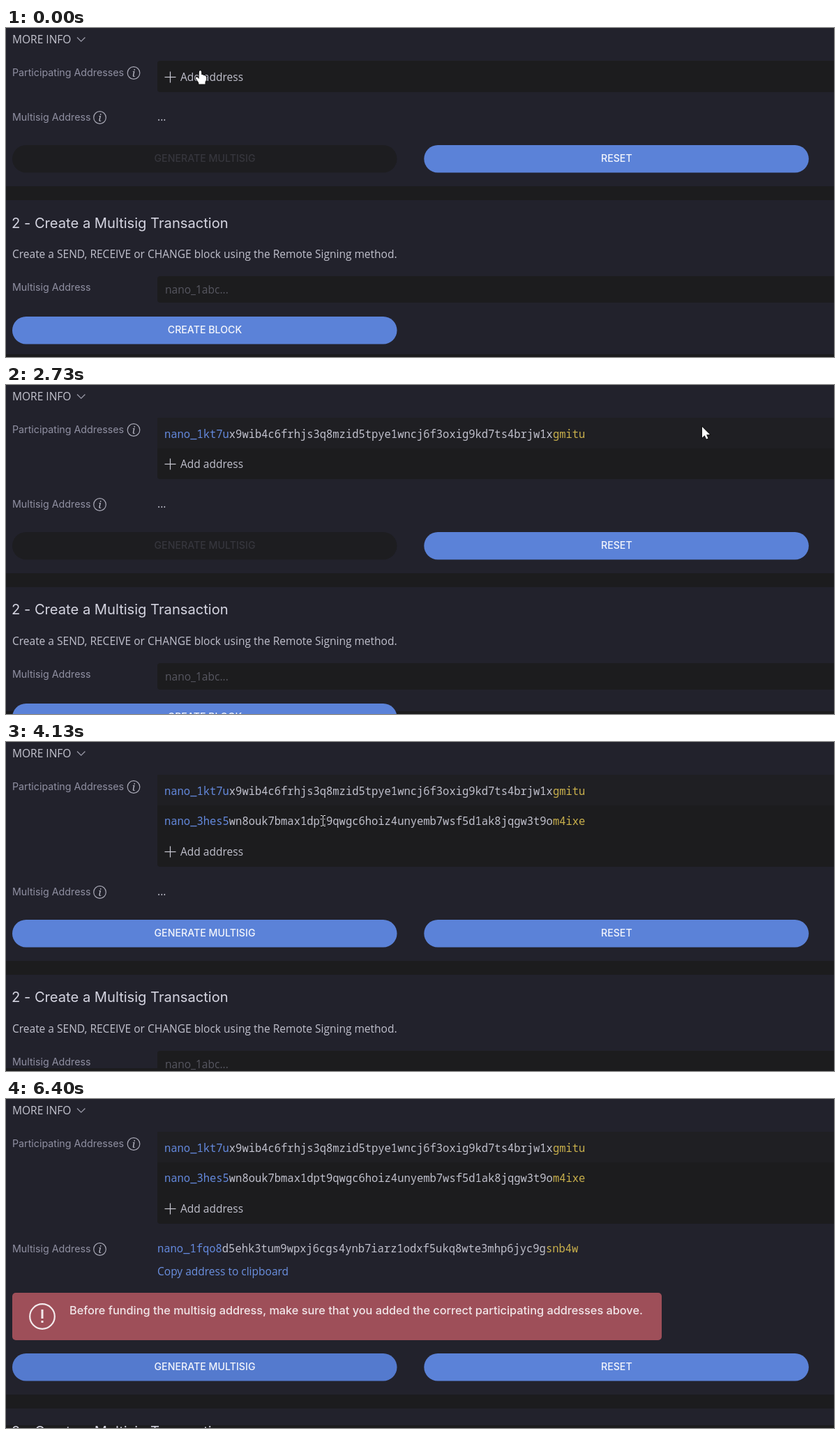
These frames come from a looping animation (1187x472 px, 6990 ms). An HTML page with a canvas:

```html
<!DOCTYPE html>
<html lang="en">
<head>
<meta charset="utf-8">
<title>Multisig form</title>
<style>
html, body { margin: 0; width: 100%; height: 100%; overflow: hidden; background: #22222c; }
canvas { display: block; }
</style>
</head>
<body>
<canvas id="stage" width="1187" height="472"></canvas>
<script>
const ctx = document.getElementById('stage').getContext('2d');
const W = 1187, H = 472, LOOP = 6990, FPS = 15, TICKS = 105;

const SANS = '15.52px "Open Sans", "Noto Sans", sans-serif';
const MONO = '500 15.48px "Noto Sans Mono", "DejaVu Sans Mono", monospace';
const LABEL = '14.25px Inter, sans-serif';
const BUTTON = '500 14.2px Inter, sans-serif';
const TITLE = '20.15px Inter, sans-serif';
const WARN = '500 16.29px Inter, sans-serif';

const BG = '#22222c', DARK = '#1c1c1e', ROW = '#1f1f23';
const TEXT = '#c1c1cd', MUTED = '#9090a2', BLUE = '#6489dd', GOLD = '#c9b04c';
const FILL = [91, 130, 216], HOVER = [77, 113, 196], OFF = [29, 29, 32];
const ROW_STEP = 43.4;

const FIRST = 'nano_1kt7ux9wib4c6frhjs3q8mzid5tpye1wncj6f3oxig9kd7ts4brjw1xgmitu';
const SECOND = 'nano_3hes5wn8ouk7bmax1dpt9qwgc6hoiz4unyemb7wsf5d1ak8jqgw3t9om4ixe';
const SHARED = 'nano_1fqo8d5ehk3tum9wpxj6cgs4ynb7iarz1odxf5ukq8wte3mhp6jyc9gsnb4w';

// Ticks (1/15 s) at which the page changes
const OPEN1 = 4, FOCUS1 = 7, PASTE1 = 11, SAVE1 = 13;
const OPEN2 = 51, FOCUS2 = 53, PASTE2 = 59, SAVE2 = 60, DONE = 75;

const clamp = v => Math.max(0, Math.min(1, v));
const mix = (a, b, p) => a + (b - a) * p;
const blend = (a, b, p) => `rgb(${a.map((v, i) => Math.round(mix(v, b[i], p)))})`;
const smooth = p => p * p * (3 - 2 * p);

function text(str, x, y, font, color, align = 'left') {
  ctx.font = font;
  ctx.fillStyle = color;
  ctx.textAlign = align;
  ctx.fillText(str, x, y);
}

function rect(x, y, w, h, color) {
  ctx.fillStyle = color;
  ctx.fillRect(x, y, w, h);
}

function round(x, y, w, h, r, color) {
  ctx.beginPath();
  ctx.roundRect(x, y, w, h, r);
  ctx.fillStyle = color;
  ctx.fill();
}

function line(points, color, width) {
  ctx.beginPath();
  points.forEach(([x, y]) => ctx.lineTo(x, y));
  ctx.strokeStyle = color;
  ctx.lineWidth = width;
  ctx.stroke();
}

function ring(x, y, r, color, width) {
  ctx.beginPath();
  ctx.arc(x, y, r, 0, Math.PI * 2);
  ctx.strokeStyle = color;
  ctx.lineWidth = width;
  ctx.stroke();
}

function info(x, y) {
  ring(x, y, 8.8, '#a9a9b6', 1.2);
  text('i', x, y + 5, 'italic 15px "Noto Serif", serif', '#b9b9c5', 'center');
}

function button(label, x, y, color, ink = '#f4f6fc') {
  round(x, y, 551.5, 39.5, 19.75, color);
  text(label, x + 276, y + 24, BUTTON, ink, 'center');
}

function address(str, x, y) {
  const parts = [[str.slice(0, 10), BLUE], [str.slice(10, -5), TEXT], [str.slice(-5), GOLD]];
  for (const [part, color] of parts) {
    text(part, x, y, MONO, color);
    x += ctx.measureText(part).width;
  }
}

function addLink(y) {
  line([[227.5, y + .5], [243.5, y + .5]], '#c8c8d2', 1.2);
  line([[235.5, y - 7.5], [235.5, y + 8.5]], '#c8c8d2', 1.2);
  text('Add address', 250, y + 6, SANS, TEXT);
}

function input(y, value, focus) {
  const top = Math.round(y), height = Math.round(y + 38.3) - top;
  ctx.beginPath();
  ctx.roundRect(227.5, top + .5, 1000, height - 1, 4);
  ctx.fillStyle = '#1b1b1d';
  ctx.fill();
  if (!focus) return;
  ctx.strokeStyle = `rgba(100, 137, 221, ${focus})`;
  ctx.lineWidth = 1;
  ctx.stroke();
  text(value, 237, top + 25, SANS, TEXT);
  rect(Math.round(238 + ctx.measureText(value).width), top + 9, 1, 21, '#d4d4de');
}

function participants(k) {
  const saved = k >= SAVE2 ? 2 : k >= SAVE1 ? 1 : 0;
  const editing = (k >= OPEN1 && k < SAVE1) || (k >= OPEN2 && k < SAVE2);
  const top = 47 + saved * ROW_STEP;
  round(217, 47, 1000, Math.round(top - 47 + (editing ? 60 : 45)), 4, DARK);
  if (saved) rect(217, 47, W, 44, ROW);
  if (saved > 0) address(FIRST, 227, 76);
  if (saved > 1) address(SECOND, 227, 119);
  if (!editing) return addLink(Math.round(top + 23));
  const start = saved ? FOCUS2 : FOCUS1;
  const value = saved ? (k >= PASTE2 ? SECOND : '') : (k >= PASTE1 ? FIRST : '');
  input(top + 11.3, value, clamp((k - start + 1) / 5));
}

function shiftAt(k) {
  if (k < OPEN1) return 0;
  if (k < SAVE1) return 15.3;
  if (k < OPEN2) return 42.8;
  return k < SAVE2 ? 58.1 : 86.8;
}

function hoverAt(k) {
  if (k < 76) return clamp((k - 68) / 3);
  if (k < 93) return clamp((k - 89) / 3);
  return Math.max(.5, 1 - (k - 92) / 8);
}

function warning() {
  text('Copy address to clipboard', 217, 253, SANS, '#6b90e0');
  round(9, 278, 931, 68, 5, '#9e4f59');
  ring(52, 312, 17.8, '#f3eaec', 2.2);
  line([[52, 302], [52, 315]], '#f3eaec', 3);
  rect(50.5, 318, 3, 3, '#f3eaec');
  text('Before funding the multisig address, make sure that you added the correct ' +
    'participating addresses above.', 91, 309, WARN, '#f1e6e9');
}

function page(k) {
  const shift = shiftAt(k), done = k >= DONE;
  const lower = done ? 197.4 : shift;
  const at = y => Math.round(y + lower);
  const mid = Math.round(128 + shift);

  rect(0, 0, W, H, BG);
  rect(0, 468, W, 4, DARK);
  text('MORE INFO', 9, 22, SANS, '#c5c5d0');
  line([[102, 13.5], [107.7, 19.2], [113.4, 13.5]], '#9a9aa8', 1.3);
  text('Participating Addresses', 9, 69, LABEL, MUTED);
  info(183, 64.5);
  participants(k);

  text('Multisig Address', 9, mid + 5, LABEL, MUTED);
  info(134.5, mid + .5);
  if (done) {
    address(SHARED, 217, mid + 5);
    warning();
  } else {
    text('...', 217, mid + 5, SANS, TEXT);
  }

  const on = clamp((k - SAVE2 + 1) / 3);
  const fill = on < 1 ? blend(OFF, FILL, on) : blend(FILL, HOVER, hoverAt(k));
  const plain = blend(FILL, FILL, 0);
  button('GENERATE MULTISIG', 9, at(167.8), fill, blend([54, 54, 61], [244, 246, 252], on));
  button('RESET', 599.3, at(167.8), plain);

  rect(0, at(226.8), W, 20, DARK);
  text('2 - Create a Multisig Transaction', 8, at(286.5), TITLE, '#d5d5e1');
  text('Create a SEND, RECEIVE or CHANGE block using the Remote Signing method.',
    9, at(330), SANS, TEXT);
  text('Multisig Address', 9, at(376.8), LABEL, MUTED);
  round(217, at(356), 1000, 38, 4, DARK);
  text('nano_1abc...', 228, at(381), SANS, '#575761');
  button('CREATE BLOCK', 9, at(413.8), plain);
}

// Pointer path: tick, x, y; held still where two points agree
const PATH = [
  [0, 278, 61], [15, 278, 61], [16, 560, 61], [17, 930, 62], [18, 1084, 62], [40, 1084, 62],
  [41, 998, 60], [50, 454, 113], [62, 454, 113], [63, 454, 114], [71, 331, 274],
  [85, 331, 274], [96, 352, 482]
];

function pointerAt(k) {
  let i = 0;
  while (i < PATH.length - 2 && k >= PATH[i + 1][0]) i++;
  const [k0, x0, y0] = PATH[i], [k1, x1, y1] = PATH[i + 1];
  const p = clamp((k - k0) / (k1 - k0)), e = k < DONE ? smooth(p) : p;
  return [Math.round(mix(x0, x1, e)), Math.round(mix(y0, y1, e))];
}

function shapeAt(k, x, y) {
  if (k < OPEN1) return hand;
  if (k < 41) return x < 831 ? beam : arrow;
  if (k < OPEN2) return y > 91 ? hand : x < 831 && y > 62 ? beam : arrow;
  if (k < 63) return beam;
  if (k < DONE) return y > 255 || (y > 140 && y < 174 && x < 345) ? hand : arrow;
  return y >= 365 && y < 405 ? hand : arrow;
}

function outline(points) {
  ctx.beginPath();
  points.forEach(([x, y]) => ctx.lineTo(x, y));
  ctx.closePath();
  ctx.strokeStyle = '#111';
  ctx.lineWidth = 1.6;
  ctx.stroke();
  ctx.fillStyle = '#fff';
  ctx.fill();
}

function arrow() {
  outline([[0, 0], [0, 15.5], [3.6, 12.2], [6, 17.6], [8.5, 16.5], [6.1, 11.2], [11, 11]]);
}

function hand() {
  outline([[-1, 1], [.5, 0], [2, 1], [2.3, 6], [4.5, 6], [5, 7], [7, 7], [7.5, 8], [9, 8.3],
    [9.3, 13], [7.5, 16.5], [7.5, 19.5], [-1.5, 19.5], [-2, 17], [-6.3, 11], [-5.6, 9.4],
    [-3.8, 9.6], [-1.4, 12]]);
}

function beam() {
  const stem = [[-3, -7.5], [-1, -7.5], [.5, -6.5], [2, -7.5], [4, -7.5]];
  const foot = stem.map(([x, y]) => [x, -y]);
  for (const [color, width] of [['#111', 3], ['#e8e8ee', 1]]) {
    line(stem, color, width);
    line([[.5, -7], [.5, 7]], color, width);
    line(foot, color, width);
  }
}

function draw(now) {
  const k = Math.floor(((now % LOOP) + 4) * FPS / 1000) % TICKS;
  page(k);
  if (k >= 96) return;
  const [x, y] = pointerAt(k);
  ctx.save();
  ctx.translate(x, y);
  shapeAt(k, x, y)();
  ctx.restore();
}

const began = performance.now();
function tick() {
  draw(performance.now() - began);
  requestAnimationFrame(tick);
}
tick();
</script>
</body>
</html>
```
